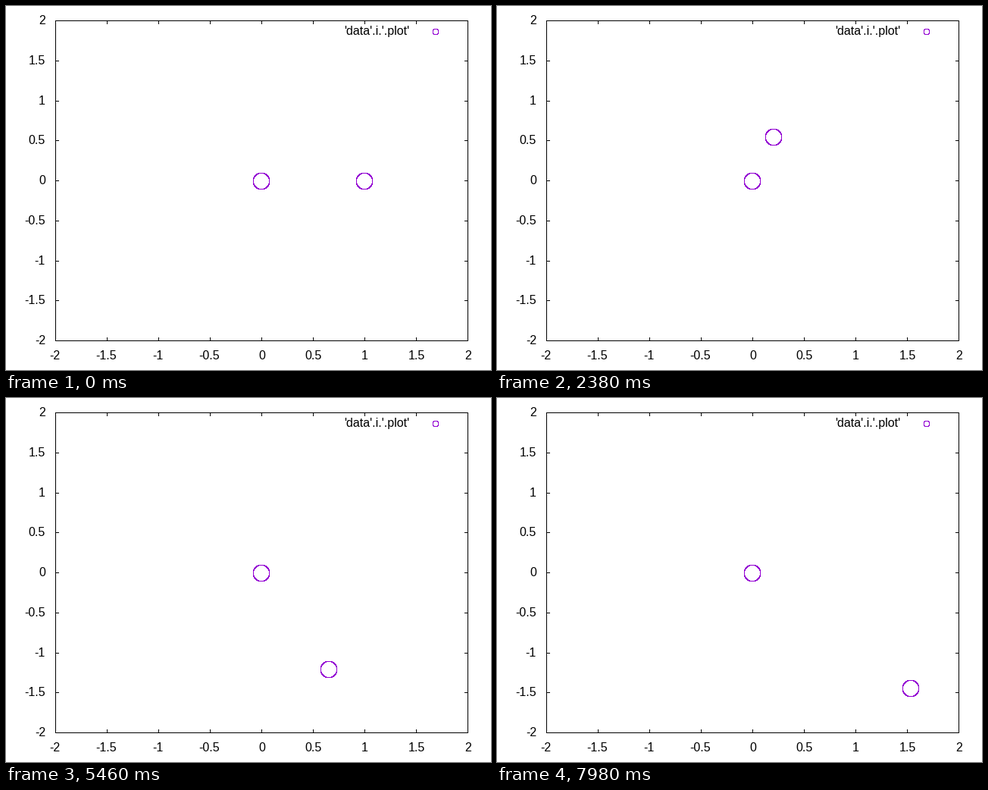
Animation of 640 by 480 pixels, one loop 8000 ms. Source, as a matplotlib script:

```python
import numpy as np
import matplotlib.pyplot as plt
from matplotlib.animation import FuncAnimation

FRAMES, STEP = 400, 20
LEFT, RIGHT, TOP, BOTTOM = 65, 609, 19, 441
CX, CY = 337, 230
SX, SY = 136, 105.5
VIOLET = "#9400d3"
GM, L = 0.25, 0.375
SWITCH = (1.6, 2.41)

fig = plt.figure(figsize=(8, 6), dpi=80, facecolor="white")
ax = fig.add_axes([0, 0, 1, 1])
ax.set_xlim(0, 640)
ax.set_ylim(480, 0)
ax.axis("off")


def line(xs, ys, color="black"):
    return ax.plot(xs, ys, color=color, lw=0.9, antialiased=False, snap=False,
                   solid_capstyle="butt", solid_joinstyle="miter")[0]


def label(x, y, text, ha):
    ax.text(x, y, text, ha=ha, va="baseline", family="Liberation Sans",
            fontsize=14.4, color="black")


def ring(cx, cy, r):
    """Circle outline with its vertices on whole pixels."""
    a = np.radians(np.arange(0, 361, 5))
    x = cx + np.floor(r * np.cos(a) + 1e-6)
    y = cy - np.floor(r * np.sin(a) + 1e-6)
    return x + 0.5, y + 0.5


def kepler(t, e, turn, t_peri):
    """Place on an ellipse around the origin at time t."""
    a = L * L / GM / (1 - e * e)
    m = np.sqrt(GM / a**3) * (t - t_peri)
    u = m + e * np.sin(m)
    for _ in range(30):
        u -= (u - e * np.sin(u) - m) / (1 - e * np.cos(u))
    z = a * complex(np.cos(u) - e, np.sqrt(1 - e * e) * np.sin(u))
    return z * np.exp(1j * np.radians(turn))


def inner(t):
    return kepler(t, 0.4375, 180, 3.646)


def outer(t):
    return kepler(t, 0.81, 162, 3.058)


def speed(path, t, h=1e-4):
    return (path(t + h) - path(t - h)) / (2 * h)


def place(t):
    t0, t1 = SWITCH
    if t <= t0:
        return inner(t)
    if t >= t1:
        return outer(t)
    # cubic passage from the first ellipse to the second
    d = t1 - t0
    s = (t - t0) / d
    return ((1 + 2 * s) * (1 - s)**2 * inner(t0)
            + s * (1 - s)**2 * d * speed(inner, t0)
            + s * s * (3 - 2 * s) * outer(t1)
            + s * s * (s - 1) * d * speed(outer, t1))


def draw_axes():
    l, r, t, b = LEFT + 0.5, RIGHT + 0.5, TOP + 0.5, BOTTOM + 0.5
    line([l, r, r, l, l, r], [t, t, b, b, t, t])
    for v in np.arange(-2, 2.1, 0.5):
        x = CX + SX * v
        y = np.floor(CY - SY * v + 0.5)
        text = f"{v:g}"
        if abs(v) < 2:
            line([x + 0.5] * 2, [BOTTOM + 1, BOTTOM - 4])
            line([x + 0.5] * 2, [TOP, TOP + 5])
            line([LEFT, LEFT + 5], [y + 0.5] * 2)
            line([RIGHT + 1, RIGHT - 4], [y + 0.5] * 2)
        label(52, y + 5, text, "right")
        label(x + 0.5 - (v < 0), 466, text, "center")


draw_axes()
label(532, 38, "'data'.i.'.plot'", "right")
line(*ring(567, 33, 3.9), VIOLET)
line(*ring(CX, CY, 10.88), VIOLET)
body = line([], [], VIOLET)


def update(i):
    z = place(i * STEP / 1000)
    x = CX + np.floor(SX * z.real + 0.5)
    y = CY - np.floor(SY * z.imag + 0.5)
    body.set_data(*ring(x, y, 10.88))
    return [body]


anim = FuncAnimation(fig, update, frames=FRAMES, interval=STEP,
                     init_func=lambda: update(0), repeat=True, repeat_delay=0)
plt.show()
```
